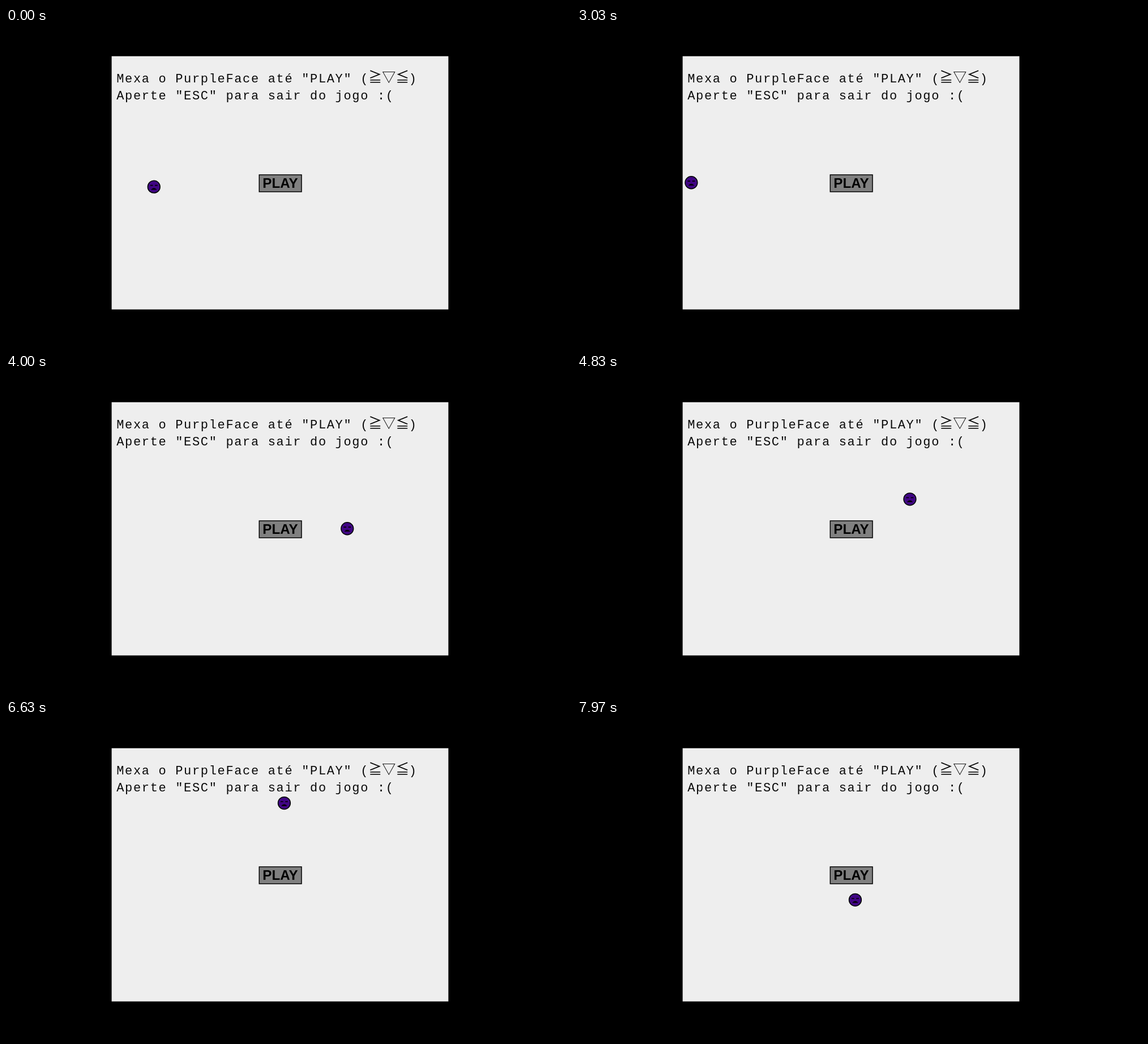
These frames come from a looping animation (998 by 561 pixels, 8000 ms). An HTML page:

```html
<!DOCTYPE html>
<html lang="pt">
<head>
<meta charset="utf-8">
<title>PurpleFace</title>
<style>
  html, body { margin: 0; width: 100%; height: 100%; overflow: hidden; background: #000; }
  svg { display: block; width: 998px; height: 561px; }
  .mono { font: 22px "Courier New", "Liberation Mono", monospace; letter-spacing: 1.66px; white-space: pre; fill: #0a0a0a; }
  .wide { font: 24px "Noto Sans CJK JP", "Noto Sans CJK", sans-serif; }
  .label { font: bold 24.2px Arial, "Liberation Sans", sans-serif; text-anchor: middle; }
</style>
</head>
<body>
<svg viewBox="0 0 998 561">
  <clipPath id="room"><rect x="186.6" y="49.7" width="594.8" height="446.7"/></clipPath>
  <rect width="998" height="561"/>
  <g clip-path="url(#room)">
    <rect x="186" y="49" width="596" height="448" fill="#eeeeee"/>
    <text class="mono" x="195.2" y="95.5">Mexa o PurpleFace até "PLAY" (</text>
    <text class="wide" x="640.3" y="95">≧▽≦</text>
    <text class="mono" x="711.8" y="95.5">)</text>
    <text class="mono" x="195.2" y="125.5">Aperte "ESC" para sair do jogo :(</text>
    <rect x="447.3" y="259" width="74.7" height="29.9" fill="#808080" stroke="#000" stroke-width="1.5"/>
    <text class="label" x="484.4" y="282">PLAY</text>
    <g id="face">
      <circle r="10.9" fill="#400583" stroke="#000" stroke-width="1.5"/>
      <path d="M-6.4-2.6h4.6M1.8-2.6h4.6" stroke="#000" stroke-width="1.6"/>
      <path d="M-4.6 4.8Q0 .2 4.6 4.8Z" fill="#000" stroke="#000" stroke-width=".8"/>
    </g>
  </g>
</svg>
<script>
const LOOP = 8000, STEP = 5, EDGE = 5;
const ROOM = { x: 400, y: 300 }, START = { x: 50, y: 155 };
const SCALE = 594 / ROOM.x;
const face = document.getElementById('face');

// Key presses and their repeats at 30 ticks a second: axis, first tick, last tick.
// Every move goes left or up.
const moves = [
  ['y', 68, 68], ['x', 70, 70], ['x', 85, 122],
  ['y', 125, 125], ['y', 140, 145],
  ['x', 146, 146], ['x', 161, 172],
  ['y', 176, 176], ['y', 191, 239]
];

// Leaving one side brings the face back on the other.
function wrap(v, size) {
  const span = size + 2 * EDGE + STEP;
  return ((v + EDGE) % span + span) % span - EDGE;
}

function place(axis, tick) {
  let steps = 0;
  for (const [a, first, last] of moves)
    if (a === axis) steps += Math.max(0, Math.min(tick, last) - first + 1);
  return wrap(START[axis] - steps * STEP, ROOM[axis]);
}

const began = performance.now();
function draw() {
  const t = (performance.now() - began) % LOOP;
  const tick = Math.floor(t * 0.03 + 0.12);
  const x = 187 + place('x', tick) * SCALE;
  const y = 50 + place('y', tick) * SCALE;
  face.setAttribute('transform', `translate(${x.toFixed(2)} ${y.toFixed(2)})`);
  requestAnimationFrame(draw);
}
draw();
</script>
</body>
</html>
```
